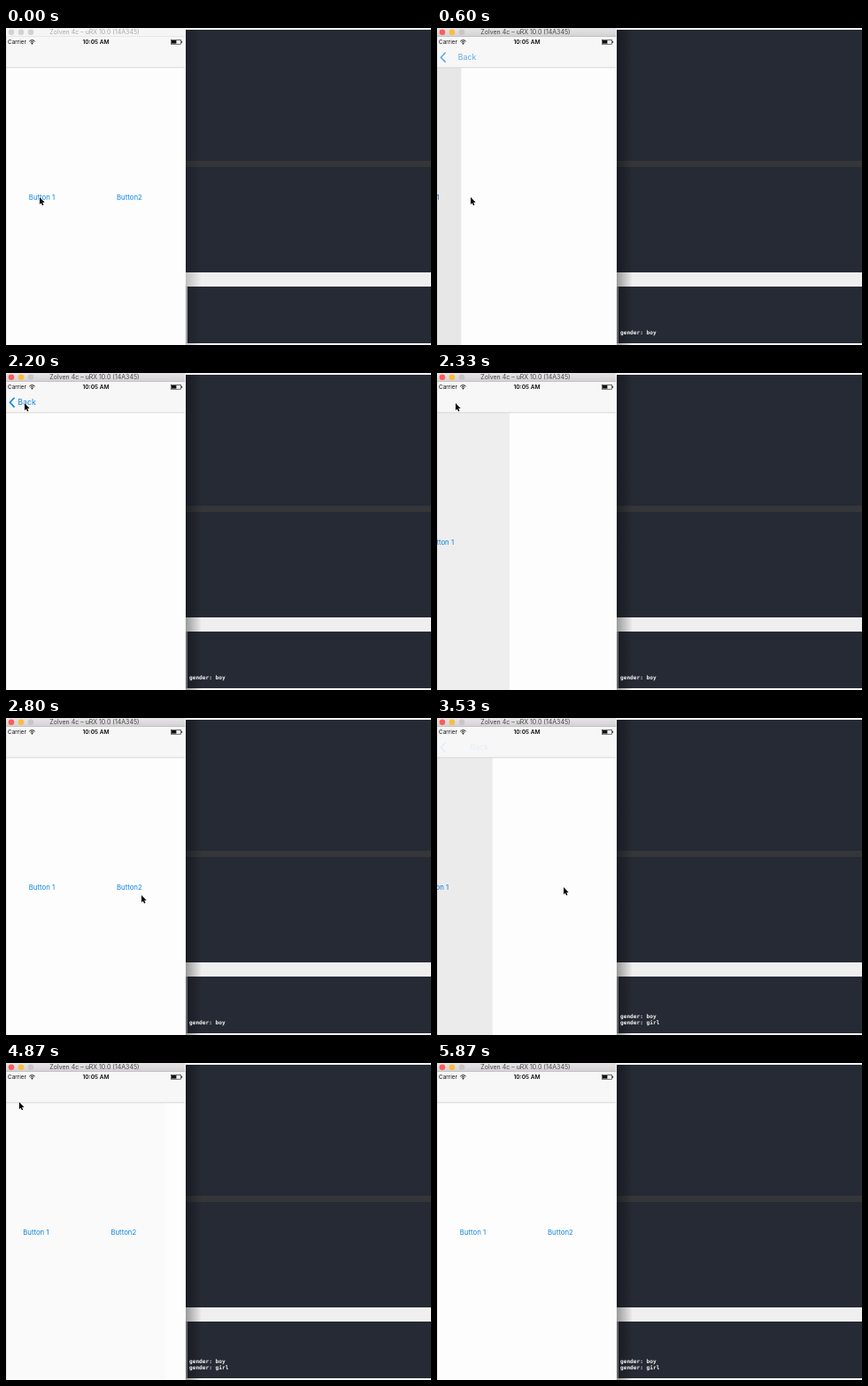
Animation of 480 by 358 pixels, one loop 5940 ms. Source, as an HTML page with a canvas:

```html
<!DOCTYPE html>
<html lang="en">
<head>
<meta charset="utf-8">
<title>Two buttons</title>
<style>
html, body { margin: 0; width: 100%; height: 100%; overflow: hidden; background: #262a34; }
canvas { display: block; width: 480px; height: 358px; }
</style>
</head>
<body>
<canvas id="stage" width="480" height="358"></canvas>
<script>
const ctx = document.getElementById('stage').getContext('2d');
const LOOP = 5940, STEP = 1000 / 15;
const PHONE = 202.5, BAR = 45;
const BLUE = '#0f86dc', PAGE = '#fdfdfe';
const SANS = 'Inter, Roboto, sans-serif';
const MONO = '"DejaVu Sans Mono", "Noto Sans Mono", monospace';

const ACTIVE = 395;
const PUSHES = [390, 3390], POPS = [2250, 4640];

// Pointer: time, x, y
const PATH = [
  [0, 38, 191], [1420, 38, 191], [2000, 21, 34], [2600, 21, 34],
  [2800, 153, 200], [2940, 155, 231], [3200, 143, 191], [3860, 143, 191],
  [4200, 28, 40], [4740, 28, 40], [5070, -12, 52]
];

const clamp = v => Math.max(0, Math.min(1, v));
const mix = (a, b, k) => a + (b - a) * k;
const smooth = k => k * k * (3 - 2 * k);

// Critically damped spring
function spring(ms) {
  if (ms <= 0) return 0;
  const x = ms * 0.0167;
  return ms > 560 ? 1 : 1 - (1 + x) * Math.exp(-x);
}

function rect(x, y, w, h, fill) {
  ctx.fillStyle = fill;
  ctx.fillRect(x, y, w, h);
}

function dot(x, y, r, fill) {
  ctx.fillStyle = fill;
  ctx.beginPath();
  ctx.arc(x, y, r, 0, Math.PI * 2);
  ctx.fill();
}

function ramp(x0, y0, x1, y1, from, to) {
  const g = ctx.createLinearGradient(x0, y0, x1, y1);
  g.addColorStop(0, from);
  g.addColorStop(1, to);
  return g;
}

function label(str, x, y, font, fill, align = 'left') {
  ctx.font = font;
  ctx.fillStyle = fill;
  ctx.textAlign = align;
  ctx.fillText(str, x, y);
}

function editor(t) {
  const active = t >= ACTIVE;
  rect(202, 0, 278, 358, '#f4f4f5');
  rect(203, 2, 277, 274, '#262a34');
  rect(203, 150, 277, 7, '#343639');
  rect(203, 276, 277, 16, '#f0eff0');
  rect(205, 292, 275, 64, '#262a34');
  rect(203, 292, 2, 64, active ? '#9c9da0' : '#c6c7c9');
  const shade = active ? 0.36 : 0.2;
  rect(203, 2, 18, 356, ramp(203, 0, 221, 0, `rgba(0,0,0,${shade})`, 'rgba(0,0,0,0)'));

  const lines = PUSHES.filter(p => t >= p).map((p, i) => 'gender: ' + ['boy', 'girl'][i]);
  lines.reverse().forEach((s, i) =>
    label(s, 207, 346 - i * 7, 'bold 6.15px ' + MONO, '#f4f4f4'));
}

function titleBar(active) {
  rect(0, 0, PHONE, 10, active ? ramp(0, 0, 0, 10, '#e7e5e7', '#d2d0d2') : '#f5f5f5');
  rect(0, 9.5, PHONE, 0.5, active ? '#b4b2b4' : '#d8d8d8');
  const lights = active ? ['#fb5d59', '#fcbb40', '#c8c6c8'] : ['#d2d2d2', '#d2d2d2', '#d2d2d2'];
  lights.forEach((c, i) => dot(6 + i * 11, 4.7, 3.3, c));
  label('Zolven 4c – uRX 10.0 (14A345)', 100, 7.2, '7px ' + SANS, active ? '#474547' : '#a9a9a9', 'center');
}

function statusBar() {
  label('Carrier', 2, 18.3, '6.4px ' + SANS, '#111');
  label('10:05 AM', 101.5, 18.3, '600 6.6px ' + SANS, '#111', 'center');

  ctx.strokeStyle = '#111';
  ctx.lineWidth = 1;
  for (const r of [2.4, 4.3]) {
    ctx.beginPath();
    ctx.arc(29.5, 18, r, -Math.PI * 0.77, -Math.PI * 0.23);
    ctx.stroke();
  }
  dot(29.5, 17.6, 0.9, '#111');

  ctx.lineWidth = 0.6;
  ctx.strokeRect(186.4, 13.4, 11.2, 4.8);
  rect(187, 14, 5.4, 3.6, '#111');
  rect(198.2, 14.8, 0.9, 2, '#111');
}

function backButton(p) {
  const alpha = clamp((p - 0.665) / 0.3);
  if (!alpha) return;
  ctx.globalAlpha = alpha;
  ctx.strokeStyle = BLUE;
  ctx.lineWidth = 1.6;
  ctx.beginPath();
  ctx.moveTo(9.6, 27.8);
  ctx.lineTo(4.4, 33.2);
  ctx.lineTo(9.6, 38.6);
  ctx.stroke();
  label('Back', 13.3 + 78 * (1 - p), 36.3, '8.8px ' + SANS, BLUE);
  ctx.globalAlpha = 1;
}

// p: 0 = button page, 1 = detail page
function phone(t, p) {
  ctx.save();
  ctx.beginPath();
  ctx.rect(0, 0, PHONE, 358);
  ctx.clip();
  rect(0, 0, PHONE, 358, PAGE);
  const shift = -0.3 * PHONE * p;
  label('Button 1', 25.8 + shift, 193.8, '7.8px ' + SANS, BLUE);
  label('Button2', 125 + shift, 193.8, '7.8px ' + SANS, BLUE);
  if (p > 0) {
    rect(0, BAR, PHONE, 313, `rgba(0,0,0,${0.1 * p})`);
    rect(PHONE * (1 - p), BAR, PHONE, 313, PAGE);
  }
  rect(0, 10, PHONE, BAR - 10, '#f7f7f8');
  rect(0, BAR - 0.5, PHONE, 0.7, '#c9c9cc');
  statusBar();
  backButton(p);
  titleBar(t >= ACTIVE);
  rect(0, 10, 0.5, 348, 'rgba(0,0,0,0.16)');
  ctx.restore();
}

function pointer(t) {
  const i = PATH.findIndex(k => k[0] > t);
  if (i < 1) return;
  const [a, b] = [PATH[i - 1], PATH[i]];
  const k = smooth((t - a[0]) / (b[0] - a[0]));
  ctx.save();
  ctx.translate(mix(a[1], b[1], k), mix(a[2], b[2], k));
  ctx.beginPath();
  [[0, 0], [0, 8.2], [1.8, 6.6], [3, 9.4], [4.4, 8.8], [3.2, 6.1], [5.7, 6]]
    .forEach(([x, y]) => ctx.lineTo(x, y));
  ctx.closePath();
  ctx.lineJoin = 'round';
  ctx.lineWidth = 1.3;
  ctx.strokeStyle = 'rgba(255,255,255,0.9)';
  ctx.stroke();
  ctx.fillStyle = '#000';
  ctx.fill();
  ctx.restore();
}

function draw(t) {
  let p = 0;
  PUSHES.forEach((start, i) => { p += spring(t - start) - spring(t - POPS[i]); });
  editor(t);
  phone(t, clamp(p));
  pointer(t);
}

const origin = performance.now();
function tick() {
  const t = Math.max(0, performance.now() - origin) % LOOP;
  draw(Math.floor((t + 3.4) / STEP) * STEP);
  requestAnimationFrame(tick);
}
tick();
</script>
</body>
</html>
```
